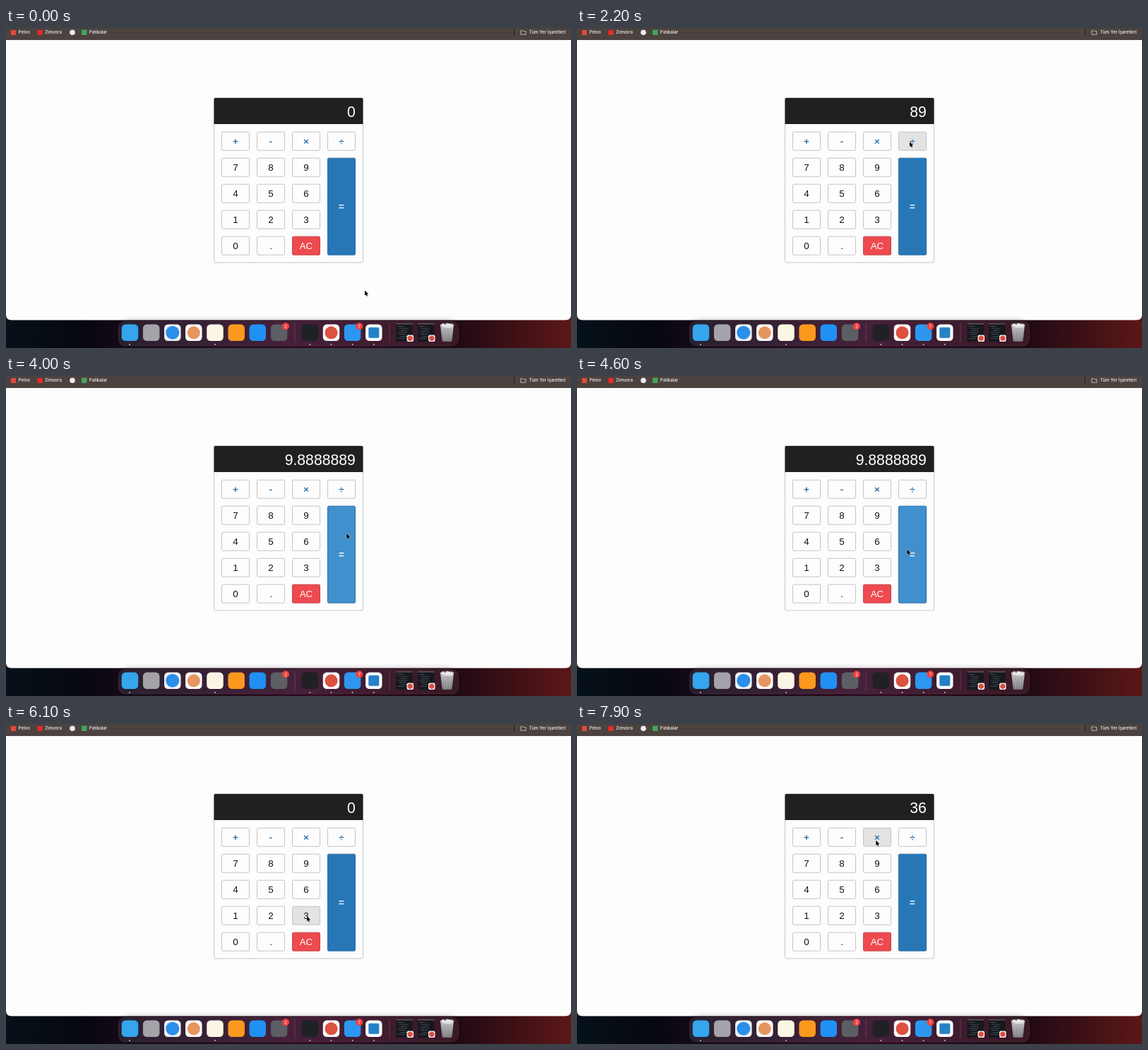
Recreate the animation shown at these times as an HTML page. Size 800x453 px, loop 8 s.

```html
<!DOCTYPE html>
<html lang="tr">
<head>
<meta charset="utf-8">
<title>Hesap makinesi</title>
<style>
  html, body { margin: 0; width: 100%; height: 100%; overflow: hidden; background: #080a12; }
  svg { display: block; width: 800px; height: 453px; }
  text { font-family: "Liberation Sans", Arial, sans-serif; }
  .bar text { font: 500 6.2px Inter, sans-serif; fill: #f4f1f0; }
  .badge { font: 6px Inter, sans-serif; fill: #fff; text-anchor: middle; }
  .key rect { fill: #fdfdfd; stroke: #c4c4c4; }
  .key text { font-size: 13.4px; fill: #111; text-anchor: middle; }
  .key.on rect { fill: #e3e3e3; }
  .op text { font-weight: bold; fill: #2d74ae; }
  .eq rect { fill: #2777b7; stroke: #2a6da5; }
  .eq.on rect { fill: #4090cd; }
  .eq text { font-weight: bold; fill: #fff; }
  .ac rect { fill: #ee4a50; stroke: #c5444a; }
  .ac.on rect { fill: #f0646a; }
  .ac text { fill: #fff; }
</style>
</head>
<body>
<svg viewBox="0 0 800 453">
  <defs>
    <linearGradient id="wall">
      <stop offset="0" stop-color="#061119"/>
      <stop offset=".14" stop-color="#07070f"/>
      <stop offset=".24" stop-color="#1d0b1d"/>
      <stop offset=".55" stop-color="#3a0d24"/>
      <stop offset=".8" stop-color="#210a14"/>
      <stop offset="1" stop-color="#5c1717"/>
    </linearGradient>
    <linearGradient id="shelf">
      <stop offset="0" stop-color="#28202f"/>
      <stop offset=".5" stop-color="#45203a"/>
      <stop offset="1" stop-color="#3a1825"/>
    </linearGradient>
    <linearGradient id="bin" x2="0" y2="1">
      <stop offset="0" stop-color="#c9c9cb"/>
      <stop offset="1" stop-color="#77777b"/>
    </linearGradient>
    <filter id="blur" x="-10%" y="-80%" width="120%" height="260%"><feGaussianBlur stdDeviation="5"/></filter>
  </defs>

  <rect y="400" width="800" height="53" fill="url(#wall)"/>
  <path d="M0 0H800V406Q800 413.5 792 413.5H8Q0 413.5 0 406Z" fill="#fdfdfd"/>

  <g class="bar">
    <rect width="800" height="17" fill="#4c423f"/>
    <rect x="7" y="3" width="7" height="7" fill="#e2483e"/>
    <text x="17.7" y="8.3">Pelvo</text>
    <rect x="44.5" y="3" width="7" height="7" fill="#f0282d"/>
    <text x="55" y="8.3">Zimvora</text>
    <circle cx="94" cy="6.3" r="3.8" fill="#eeecec"/>
    <rect x="107" y="2.5" width="7.5" height="7.5" fill="#43a45b"/>
    <text x="117.7" y="8.3">Patikalar</text>
    <path d="M719.5 2V11" stroke="#241e1c"/>
    <path d="M728.7 9.2V3.7H731.6L732.6 4.7H736V9.2Z" fill="none" stroke="#d8d3d1" stroke-width=".8"/>
    <text x="792.5" y="8.3" text-anchor="end">Tüm Yer İşaretleri</text>
  </g>

  <rect x="294.5" y="99" width="211" height="233" rx="2" fill="#fdfdfd" stroke="#c6c6c6"/>
  <path d="M294.5 136V101Q294.5 99 296.5 99H503.5Q505.5 99 505.5 101V136Z" fill="#1f2120"/>
  <text id="screen" x="494.8" y="125.5" font-size="21.2" fill="#fff" text-anchor="end">0</text>
  <g id="keys"></g>

  <rect x="164" y="416" width="472" height="34" rx="9" fill="#000" opacity=".42" filter="url(#blur)"/>
  <rect x="159.5" y="415.5" width="481" height="34.5" rx="9" fill="url(#shelf)" stroke="#fff" stroke-opacity=".13" stroke-width=".7"/>
  <path d="M409 418V445M543 418V445" stroke="#8a6a7a" stroke-opacity=".55" stroke-width=".8"/>
  <g id="dock"></g>

  <path d="M615 420H634L631.5 442.5Q631 444 629 444H620Q618 444 617.5 442.5Z" fill="url(#bin)"/>
  <path d="M616 422L618 418 622 420 625 417.5 629 419.5 632 418.5 633 423Q624.5 426 616 422Z" fill="#efeff0"/>
  <path d="M620 426L621.5 442M624.5 427V442M629 426L627.5 442" stroke="#a9a9ad" stroke-width=".8"/>
  <ellipse cx="624.5" cy="420.5" rx="9.6" ry="2.2" fill="none" stroke="#bdbdc0" stroke-width=".7"/>

  <path id="cursor" d="M0 0V7.2L1.7 5.7 2.8 8.3 4.1 7.7 3 5.2H5.2Z" fill="#000" stroke="#fff" stroke-width=".7" paint-order="stroke"/>
</svg>

<script>
const LOOP = 8000, STEP = 100;
const byId = id => document.getElementById(id);

function add(parent, tag, attrs, text) {
  const el = document.createElementNS("http://www.w3.org/2000/svg", tag);
  for (const k in attrs) el.setAttribute(k, attrs[k]);
  if (text) el.textContent = text;
  return parent.appendChild(el);
}

// Keypad
const keys = [];
function addKey(label, col, row, kind = "", h = 26) {
  const x = 305.5 + col * 50, y = 147.2 + row * 37, w = 39;
  const el = add(byId("keys"), "g", { class: "key " + kind });
  add(el, "rect", { x, y, width: w, height: h, rx: 1.5 });
  add(el, "text", { x: x + w / 2, y: y + h / 2 + 4.7 }, label);
  keys.push({ el, x, y, w, h });
}
[..."+-×÷"].forEach((c, i) => addKey(c, i, 0, "op"));
[..."7894561230."].forEach((c, i) => addKey(c, i % 3, 1 + Math.floor(i / 3)));
addKey("AC", 2, 4, "ac");
addKey("=", 3, 1, "eq", 137);

// Dock: centre, tile colour, then optional mark and its corner radius
const dock = byId("dock");
const square = (cx, cy, size, rx, fill) =>
  add(dock, "rect", { x: cx - size / 2, y: cy - size / 2, width: size, height: size, rx, fill });
[
  [175.5, "#35a5ee"], [205.7, "#a5a3a9"], [235.8, "#f1f3f5", "#2b8eea", 9.5],
  [265.8, "#fafafa", "#e6955f", 9], [296, "#faf6e6"], [326.2, "#fb991f"],
  [356.3, "#2090f3"], [386.6, "#5d5e63"], [430.3, "#202124"],
  [460.5, "#fafafa", "#dc5140", 9], [490.6, "#2d97f0"], [520.8, "#f7f9fb", "#2580c7", 2]
].forEach(([x, tile, mark, rx]) => {
  square(x, 431.3, 23.5, 5.5, tile);
  if (mark) square(x, 431.3, rx > 5 ? rx * 2 : 15, rx, mark);
});
for (const x of [175, 296, 430.3, 460.5, 490.6, 520.8])
  add(dock, "circle", { cx: x, cy: 448, r: 1, fill: "#cbbfc6" });
for (const [x, n] of [[396, 2], [500.3, 7]]) {
  add(dock, "circle", { cx: x, cy: 422.3, r: 5, fill: "#f2403d" });
  add(dock, "text", { x, y: 424.5, class: "badge" }, n);
}
for (const x of [552.5, 583]) {
  add(dock, "rect", { x, y: 418, width: 23.5, height: 26, fill: "#15181d" });
  add(dock, "rect", { x, y: 418, width: 23.5, height: 1.6, fill: "#5a5356" });
  for (let i = 0; i < 7; i++)
    add(dock, "rect", { x: x + 2 + i % 3 * 2, y: 422 + i * 2.8, width: 8 + i * 5 % 9, height: .8, fill: i % 2 ? "#3c5366" : "#555b63" });
  square(x + 19.8, 439.3, 9.5, 2.3, "#fafafa");
  square(x + 19.8, 439.3, 7.4, 3.7, "#dc5140");
}

// Pointer stops: time, x, y
const path = [
  [0, 508, 371.5], [200, 505, 366], [700, 386, 199], [900, 386, 199],
  [1150, 407.5, 195.5], [1500, 407.5, 195.5], [2000, 471, 161], [2400, 471, 161],
  [2900, 406.3, 195.3], [3000, 406.3, 195.3], [3100, 412, 196], [3300, 412, 196],
  [3700, 482.3, 223], [4400, 482.3, 223], [5000, 424.5, 309.5], [5600, 424.5, 309.5],
  [6000, 426, 272], [6400, 426, 272], [6700, 432.3, 233.8], [7200, 432.3, 233.8],
  [7700, 423.3, 164.8], [LOOP, 423.3, 164.8]
];
const readings = [[0, "0"], [800, "8"], [1200, "89"], [3200, "9"], [3800, "9.8888889"],
  [5400, "0"], [6200, "3"], [6800, "36"]];

function pointer(t) {
  const i = path.findIndex(p => p[0] > t);
  const [t0, x0, y0] = path[i - 1], [t1, x1, y1] = path[i];
  const u = (t - t0) / (t1 - t0), e = u * u * (3 - 2 * u);
  return [x0 + (x1 - x0) * e, y0 + (y1 - y0) * e];
}

function draw(now) {
  const t = Math.floor(now % LOOP / STEP) * STEP;
  const [x, y] = pointer(t);
  byId("cursor").setAttribute("transform", `translate(${x} ${y})`);
  byId("screen").textContent = readings.findLast(r => r[0] <= t)[1];
  for (const k of keys)
    k.el.classList.toggle("on", x > k.x + 1.5 && x < k.x + k.w && y > k.y && y < k.y + k.h);
  requestAnimationFrame(draw);
}
draw(0);
</script>
</body>
</html>
```
